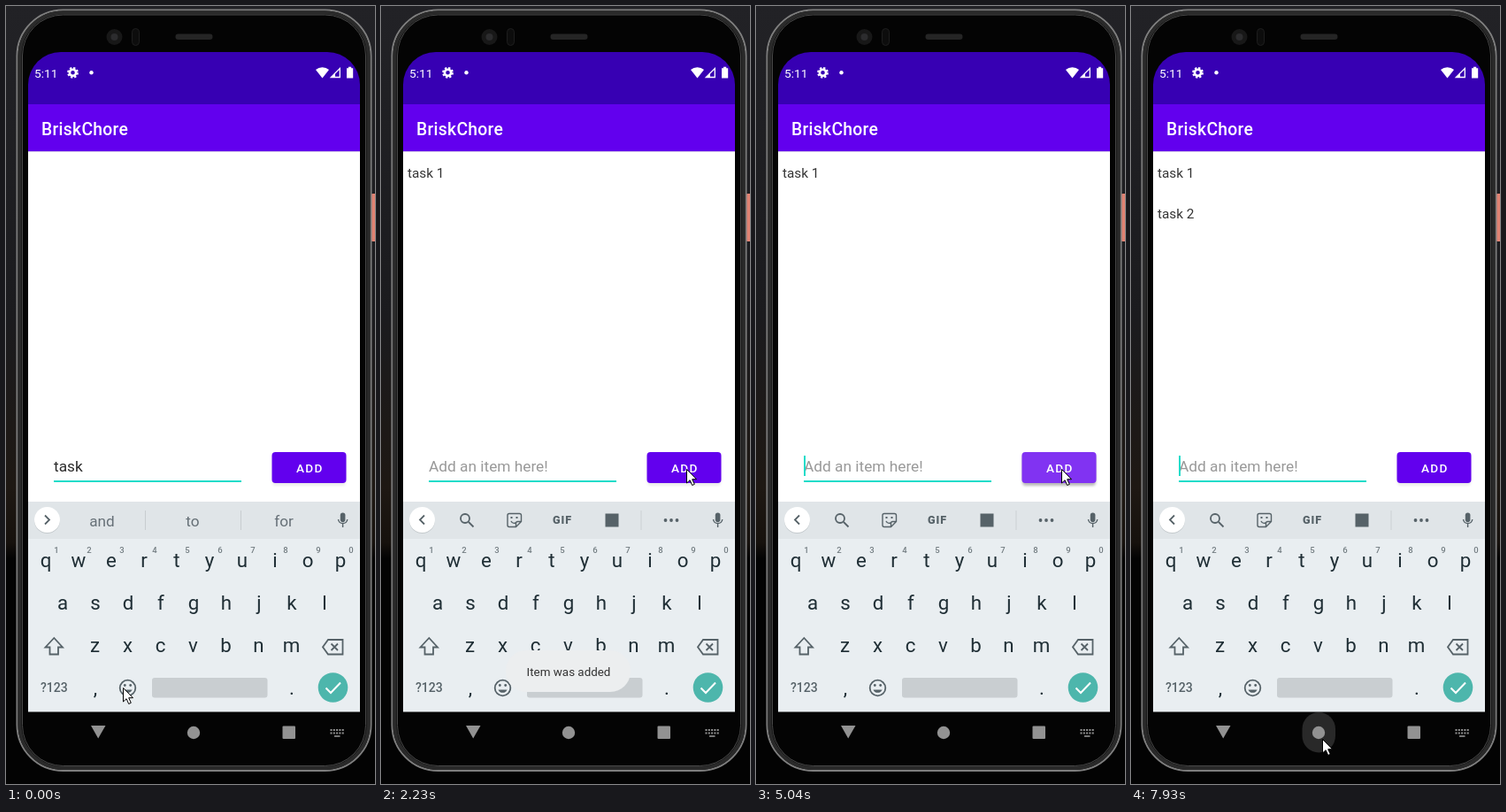
Write an HTML page that moves like this. It is 417 px wide and 879 px high and loops after 8 s.

```html
<!DOCTYPE html>
<html lang="en">
<head>
<meta charset="utf-8">
<title>To-do list demo</title>
<style>
html, body { margin: 0; width: 100%; height: 100%; overflow: hidden; background: #000; }
svg { display: block; font-family: Roboto, sans-serif; }
text { white-space: pre; }
.mid { text-anchor: middle; }
.key { font-size: 22.3px; fill: #1f2e35; }
.sup { font-size: 9.5px; font-weight: 500; fill: #737d82; }
.word { font-size: 17.2px; fill: #667077; }
.line { fill: none; stroke: #566268; stroke-width: 1.8; }
.thin { stroke-width: 1.4; }
.solid { fill: #566268; }
</style>
</head>
<body>
<svg width="417" height="879" viewBox="0 0 417 879">
  <defs>
    <linearGradient id="night" x2="0" y2="1">
      <stop offset="0" stop-color="#222226"/>
      <stop offset=".4" stop-color="#1b1b1e"/>
      <stop offset=".62" stop-color="#1e1813"/>
      <stop offset=".69" stop-color="#16110d"/>
      <stop offset=".71" stop-color="#030303"/>
    </linearGradient>
    <filter id="blur" x="-20%" y="-40%" width="140%" height="180%"><feGaussianBlur stdDeviation="1.800"/></filter>
  </defs>

  <!-- Phone body -->
  <rect width="417" height="879" fill="url(#night)"/>
  <rect x="413" y="212" width="5" height="54" rx="1" fill="#e08373"/>
  <rect x="12.500" y="4.500" width="400" height="859.500" rx="52" fill="#050505" stroke="#7e7e7e" stroke-width="2"/>
  <rect x="15.500" y="7.500" width="394" height="853.500" rx="49" fill="none" stroke="#2a2a2a" stroke-width="4"/>
  <rect x="18.500" y="10" width="388" height="848.500" rx="46" fill="#040404" stroke="#484848" stroke-width="1"/>
  <circle cx="122.500" cy="35" r="9" fill="#181818"/>
  <circle cx="122.500" cy="35" r="4" fill="#2c2c2e"/>
  <rect x="142.500" y="25.500" width="8" height="19" rx="4" fill="#0d0d0d" stroke="#1e1e1e"/>
  <rect x="191.500" y="31.500" width="42" height="6.500" rx="3.200" fill="#252525"/>

  <!-- Status and app bars -->
  <path d="M25 165V89a37 37 0 0 1 37-37H363a37 37 0 0 1 37 37V165Z" fill="#3700b3"/>
  <rect x="25" y="111" width="375" height="53" fill="#6200ee"/>
  <rect x="25" y="164" width="375" height="396" fill="#fff"/>
  <rect x="25" y="164" width="375" height="1" fill="#cbbbe6"/>
  <g fill="#fff">
    <text x="32" y="80.500" font-size="13.700">5:11</text>
    <g fill="none" stroke="#fff">
      <circle cx="75.500" cy="75.300" r="3.600" stroke-width="2.600"/>
      <circle cx="75.500" cy="75.300" r="5.400" stroke-width="2" stroke-dasharray="2.3 1.940"/>
    </g>
    <circle cx="96.500" cy="75.300" r="2.200"/>
    <path d="M350 72a11.500 11.500 0 0 1 15 0L357.500 81.500Z"/>
    <path d="M377.300 70.500V80.500H367.300Z" fill="none" stroke="#fff" stroke-width="1.300"/>
    <path d="M372 75.500V81H367Z"/>
    <path d="M385 70.300h2v-1.500h3.200v1.500h2V81.500H385Z"/>
    <text x="40" y="145.500" font-size="19.300" font-weight="500" letter-spacing=".3">BriskChore</text>
  </g>

  <!-- List and entry row -->
  <g font-size="15.300" fill="#333">
    <text id="task1" x="30" y="193.500">task 1</text>
    <text id="task2" x="30" y="239.500">task 2</text>
  </g>
  <text id="entry" x="54" y="526" font-size="17.300"></text>
  <rect x="54" y="536" width="212" height="2" fill="#1fdcc9"/>
  <rect id="caret" y="508" width="2" height="23" fill="#1fdcc9"/>
  <rect id="shade" x="301" y="507" width="83" height="35" rx="4" filter="url(#blur)"/>
  <rect x="300.500" y="504" width="84" height="35" rx="4" fill="#6200ee"/>
  <rect id="ripple" x="300.500" y="504" width="84" height="35" rx="4" fill="#fff"/>
  <text class="mid" x="343.300" y="527" font-size="13.600" font-weight="500" letter-spacing="1.200" fill="#fff">ADD</text>

  <!-- Keyboard -->
  <rect x="25" y="560" width="375" height="42" fill="#e0e5e8"/>
  <rect x="25" y="602" width="375" height="195.500" fill="#e9eef1"/>
  <circle cx="46.500" cy="581.500" r="14.500" fill="#c4cacd"/>
  <circle cx="46.500" cy="580.500" r="14.500" fill="#fff"/>
  <path id="chevron" class="line"/>
  <g id="words">
    <path d="M157.500 570V592M265.500 570V592" stroke="#c8cdd0"/>
    <text class="mid word" x="108.500" y="588"></text>
    <text class="mid word" x="211" y="588"></text>
    <text class="mid word" x="314" y="588"></text>
  </g>
  <g id="tools">
    <path class="line" d="M99 583l5.500 5.500"/>
    <circle class="line" cx="95" cy="579" r="5"/>
    <path class="line thin" d="M145 573.500H156.500a2 2 0 0 1 2 2V582.500L152.500 588.500H145a2 2 0 0 1-2-2V575.500a2 2 0 0 1 2-2ZM158 582.500H154.500a2 2 0 0 0-2 2V588M147 582a4 4 0 0 0 5 2"/>
    <path class="solid" d="M146.500 577h2v2h-2zM152.500 577h2v2h-2z"/>
    <text class="mid solid" x="205" y="585.200" font-size="12.500" font-weight="900" letter-spacing="1">GIF</text>
    <rect class="solid" x="253.500" y="573.500" width="15" height="15"/>
    <path d="M294 570V592" stroke="#ccd1d4"/>
    <g class="solid"><circle cx="321.500" cy="581" r="1.900"/><circle cx="328" cy="581" r="1.900"/><circle cx="334.500" cy="581" r="1.900"/></g>
  </g>
  <rect class="solid" x="377.800" y="572.500" width="5.600" height="10.500" rx="2.800"/>
  <path class="line thin" d="M375.500 580a5.200 5.200 0 0 0 10.300 0M380.600 585V589"/>
  <g id="keys"></g>
  <path class="line" d="M54.300 714L44.500 724.500H49.500V732.500H59V724.500H64Z"/>
  <path class="line" d="M364 716H380.500V732.500H364L358 724.200ZM367.500 720.500l7.500 7.500m0-7.500l-7.500 7.500"/>
  <text class="mid" x="54.300" y="775" font-size="14" font-weight="500" fill="#566268">?123</text>
  <circle class="line" cx="137.500" cy="770.500" r="8.800"/>
  <path class="solid" d="M132.500 772.500a5.400 5.400 0 0 0 10 0Z"/>
  <g class="solid"><circle cx="134.300" cy="767.500" r="1.400"/><circle cx="140.700" cy="767.500" r="1.400"/></g>
  <rect x="165" y="759" width="130.500" height="22.500" rx="3" fill="#c9ced1"/>
  <circle cx="369.500" cy="770" r="16.800" fill="#4db6ac"/>
  <path d="M361.500 770.500l5.500 5.500L378 764.500" fill="none" stroke="#fff" stroke-width="2"/>

  <!-- Toast -->
  <g id="toast">
    <rect x="141" y="728" width="141" height="47" rx="23" fill="#eceeef"/>
    <text class="mid" x="212" y="757" font-size="13.400" fill="#333">Item was added</text>
  </g>

  <!-- Navigation bar -->
  <rect id="homePress" x="193.500" y="798" width="37.500" height="45.500" rx="18.700" fill="#292929"/>
  <g fill="#929292">
    <path d="M96 813H112.500L104.200 827.500Z"/>
    <circle cx="212" cy="821" r="7.200"/>
    <rect x="312.500" y="813.500" width="14.500" height="14.500" rx="1"/>
    <path d="M371 825H377.500" stroke="#929292" stroke-width="1.600"/>
  </g>
  <path d="M366.500 818H382M366.500 821.500H382" stroke="#929292" stroke-width="2" stroke-dasharray="2 1.300"/>

  <path id="pointer" d="M.5 .5V16L4.100 12.700 6.700 18.500 9.300 17.300 6.700 11.700H11.500Z" fill="#fff" stroke="#000" stroke-linejoin="round"/>
</svg>
<script>
const $ = id => document.getElementById(id);
const LOOP = 8000;

// Each entry holds from its time until the next one.
const typed = [
  [0, 'task ', 'and to for'], [130, 'task 1'], [1800, ''],
  [2700, 'ta', 'ta take that'], [3000, 'tas', 'tas was taste'],
  [3770, 'task', 'task tasks taken'], [4000, 'task ', 'and to for'],
  [4300, 'task 2'], [5040, '']
];
const caretOn = [
  [0, 0], [130, 1], [780, 0], [1280, 1], [2230, 0], [2700, 1], [3470, 0], [3770, 1],
  [5540, 0], [5990, 1], [6580, 0], [7040, 1], [7540, 0], [7930, 1]
];

// Time, x, y of the pointer tip, joined by straight moves.
const pointerPath = [
  [0, 132, 770], [650, 132, 770], [900, 245, 640], [1080, 370, 470], [1250, 400, 490],
  [1500, 352, 520], [1650, 345, 523], [5400, 345, 523], [5840, 341, 814], [5990, 344, 865],
  [6270, 341, 695], [6900, 341, 695], [7150, 370, 740], [7450, 290, 800], [7770, 216, 828], [LOOP, 216, 828]
];

const hold = (track, t) => track.findLast(k => k[0] <= t);
const ramp = (t, from, to) => Math.min(1, Math.max(0, (t - from) / (to - from)));
const pulse = (t, a, b, c, d) => ramp(t, a, b) - ramp(t, c, d);
const fade = (id, value) => $(id).setAttribute('opacity', value);

function pointerAt(t) {
  const i = Math.max(1, pointerPath.findIndex(k => k[0] > t));
  const [t0, x0, y0] = pointerPath[i - 1], [t1, x1, y1] = pointerPath[i];
  const p = ramp(t, t0, t1);
  return [x0 + (x1 - x0) * p, y0 + (y1 - y0) * p];
}

function buildKeys() {
  const rows = [['qwertyuiop', 45, 634], ['asdfghjkl', 64, 682], ['zxcvbnm', 100.5, 730]];
  const label = (c, x, y, kind = 'key') => `<text class="mid ${kind}" x="${x}" y="${y}">${c}</text>`;
  let out = label(',', 101, 778) + label('.', 323, 778);
  rows.forEach(([chars, x, y], row) => [...chars].forEach((c, i) => {
    out += label(c, x + 37 * i, y);
    if (!row) out += label((i + 1) % 10, x + 12 + 37 * i, 618, 'sup');
  }));
  $('keys').innerHTML = out;
}

function showEntry(t) {
  const [, text, words] = hold(typed, t);
  const entry = $('entry');
  entry.textContent = text || 'Add an item here!';
  entry.setAttribute('fill', text ? '#2a2a2a' : '#999');
  entry.setAttribute('text-decoration', words && !text.endsWith(' ') ? 'underline' : 'none');
  $('caret').setAttribute('x', 54 + (text ? entry.getComputedTextLength() : 0));
  fade('caret', hold(caretOn, t)[1]);

  fade('words', words ? 1 : 0);
  fade('tools', words ? 0 : 1);
  $('chevron').setAttribute('d', words ? 'M44 575.500l5 5-5 5' : 'M49 575.500l-5 5 5 5');
  if (words) {
    const slots = $('words').querySelectorAll('text');
    words.split(' ').forEach((w, i) => slots[i].textContent = w);
  }
}

function draw(now) {
  const t = now % LOOP;
  showEntry(t);
  fade('task1', ramp(t, 1760, 2180));
  fade('task2', ramp(t, 5130, 5500));
  fade('toast', pulse(t, 1760, 2180, 3850, 4250) + pulse(t, 5130, 5500, 7200, 7600));
  const press = pulse(t, 1600, 1650, 1850, 2230) + pulse(t, 4860, 4910, 5190, 5540);
  fade('ripple', press * .2);
  fade('shade', .08 + pulse(t, 1800, 1950, 2000, 2230) * .2 + pulse(t, 4900, 5020, 5190, 5540) * .2);
  fade('homePress', ramp(t, 7740, 7900));
  $('pointer').setAttribute('transform', `translate(${pointerAt(t)})`);
  requestAnimationFrame(draw);
}

buildKeys();
requestAnimationFrame(draw);
</script>
</body>
</html>
```
